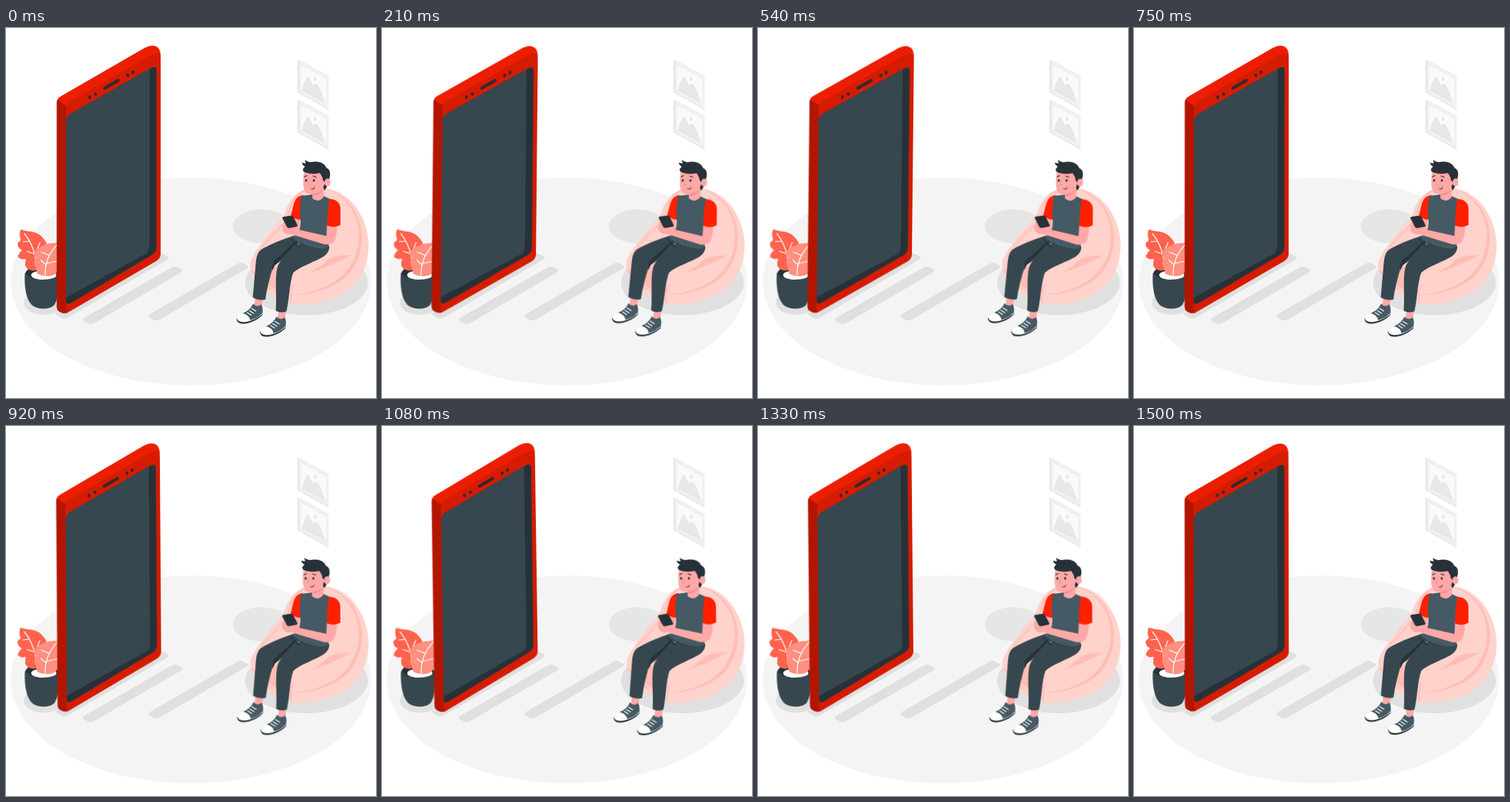
Animation of 500x500 px, one loop 1.54 s. Source, as an HTML page without scripts:

```html
<!DOCTYPE html>
<html lang="en">
<head>
<meta charset="utf-8">
<title>Phone and reader</title>
<style>
  html, body { margin: 0; width: 100%; height: 100%; overflow: hidden; background: #fff; }
  svg { display: block; width: 100vw; height: 100vh; }
  .sway { animation: sway 1.54s linear infinite; }
  .plant { transform-origin: 48px 325px; }
  .phone { transform-origin: 139px 205px; }
  .reader { transform-origin: 401px 298px; }
  @keyframes sway {
    25% { transform: rotate(1deg); }
    75% { transform: rotate(-1deg); }
  }
  .line { fill: none; stroke-linecap: round; stroke-linejoin: round; }
  .dark { fill: #263238; }
  .slate { fill: #37474f; }
  .skin { fill: #ffa8a7; }
  .red { fill: #ff2000; }
</style>
</head>
<body>
<svg viewBox="0 0 500 500">
  <defs>
    <g id="picture">
      <path fill="#e6e6e6" d="M394 44l2-1 40 22v44l-1 1-41-23z"/>
      <path fill="#f0f0f0" d="M396 43l40 22v44l-40-22z"/>
      <path fill="#fafafa" d="M398.500 50l34 18.500v35l-34-18.500z"/>
      <path fill="#e8e8e8" d="M399 84.500c3-6 5-15 8-19 3 1 5 8 8 12 2-2 4-3 6-1 4 5 8 16 11 26z"/>
      <ellipse fill="#e8e8e8" cx="418" cy="68.500" rx="2" ry="2.700"/>
    </g>
    <path id="bar" d="M105 392L224 323.500q4-2 8-.5l5 3q3 2 0 4L119 399q-4 2-8 .5l-6-3.500q-2-2 0-4z"/>
    <g id="shoe">
      <path class="skin" d="M337 364l10 2-2 12q-5 3-10-1z"/>
      <path class="dark" d="M311.500 393q2-4 12-6l23-6v7q-8 8-20 11-14 3-15-6z"/>
      <path fill="#fff" d="M312 392q3-5 12-7l7 5 15-7v4q-8 7-20 10-13 2-14-5z"/>
      <path fill="#455a64" d="M334 372.500q5 6 11 1 3 5 1 12-6 7-16 9.500-1-7-10-9.500 10-4 14-13z"/>
      <path class="line" stroke="#fff" stroke-width="1.200" d="M332 379l5.500 3.500M329 382l5.500 3.500M326 384.500l5.500 3.500"/>
    </g>
  </defs>

  <ellipse fill="#f4f4f4" cx="250" cy="342.500" rx="243.500" ry="140.500"/>
  <g fill="#e0e0e0">
    <ellipse fill="#e6e6e6" cx="345" cy="268" rx="38.500" ry="23"/>
    <ellipse cx="406" cy="344" rx="83" ry="44"/>
    <ellipse cx="51" cy="371" rx="27" ry="16.500"/>
    <path d="M66 386L207 303l11 5q3 2 0 5L84 391q-5 3-9 1z"/>
    <use href="#bar"/>
    <use href="#bar" x="88.500" y="-5"/>
  </g>
  <use href="#picture"/>
  <use href="#picture" y="54"/>

  <g class="sway plant">
    <path class="dark" d="M26 332C27 325 38 322 50 323c12 1 21 5 21 10l-4 9H32z"/>
    <ellipse fill="#fff" cx="51" cy="334" rx="17" ry="6.500"/>
    <path class="slate" d="M25.500 331c5 7 15 9 24 9 11 0 20-3 22-7 1 17 0 31-6 41-6 7-23 7-31 0-8-9-10-26-9-43z"/>
    <path fill="#ff634d" d="M20 272c6 3 12 2 18 4 7 2 10 5 13 9 4 4 5 9 4 14l-9 22c-2 4-4 6-8 7-5 0-10-2-12-7 0-3 0-6 1-9-5 1-9 0-11-3 1-4 3-6 6-9-4-1-7-5-6-10 2-1 3-2 4-4-2-5-2-9 0-14z"/>
    <path class="line" stroke="#fff" stroke-width="1.200" d="M25 278q15 18 17 49M32 288l-9 1M40 306l-11-4M40 304l6-14"/>
    <path fill="#ff8f80" d="M71 290c-8 1-14 0-21 4-8 3-13 7-12 14l3 3c-3 4-4 8-1 12l2 3c-2 5 1 7 5 8 8 2 15 2 20-2l4-6z"/>
    <path class="line" stroke="#fff" stroke-width="1.200" d="M70 292q-18 18-17 42M58 307l-10-4M54 320l-7-6M55 318l14-3"/>
  </g>

  <g class="sway phone">
    <path fill="#b31600" d="M68.500 101q0-5 5-8l15 7-4 284q-4 2.500-9 1l-4-2q-3-2-3-7z"/>
    <path fill="#ec1e02" d="M69.500 97q1-3 5-5L188 26.500q10-5 16-1 5 3 5 13l-20 5L84 106q-9-4-14.500-9z"/>
    <path fill="#d51c03" d="M81 109q0-6 6-10L194 37.500q10-5 13-2.500 2 1 2 7v263q0 6-6 10L87 382.500q-6 3.500-6-3z"/>
    <path class="dark" d="M81 127q0-7 6-11L196 54q7.500-4 7.500 4v238q0 7-6 10.500L88 371.500q-7 4-7-3z"/>
    <path class="slate" d="M81 127q0-7 6-11L194 55v240q0 7-6 10.500L81 364.500z"/>
    <path class="line" stroke="#35282a" stroke-width="4.300" d="M133.500 81.300l18-10.300"/>
    <g fill="#35282a">
      <ellipse cx="113" cy="93.700" rx="2" ry="2.400"/>
      <ellipse cx="121" cy="89.300" rx="2" ry="2.400"/>
      <ellipse cx="164.500" cy="64" rx="2" ry="2.400"/>
      <ellipse cx="171.500" cy="60" rx="2" ry="2.400"/>
    </g>
  </g>

  <g class="sway reader">
    <path fill="#ffd2cc" d="M330 321c0-13 14-27 24-42 7-10 17-17 22-28 6-18 17-33 37-35 19-1 36 2 51 16 17 16 26 40 26 62 0 23-8 43-23 56-17 15-44 24-69 24-22 0-39-10-52-24-9-9-16-19-16-29z"/>
    <path fill="#ffbdb4" d="M434 217c26 9 41 29 46 54 4 26-5 47-18 63-20 18-46 26-76 27 34-4 55-13 71-29 14-15 20-32 20-53-1-25-13-47-43-62z"/>
    <path fill="#ffbdb4" d="M466 307c-12-1-22 1-31 6-7 7-17 14-27 19 18-6 37-14 58-25z"/>
    <path class="line" stroke="#ffbdb4" stroke-width="1.500" d="M404 219q-18 9-22 33M382 252q-6 14-36 43M332 327q9 14 28 28M388 347q-4 10-3 25"/>
    <path fill="#ffbdb4" d="M361 322l7 2-2 30q-7-2-12-8z"/>

    <use href="#shoe"/>
    <use href="#shoe" x="31.500" y="17.500"/>
    <path class="slate" d="M392 280c-18 5-37 13-48 20-6 5-6 14-7 24l-3.500 40q8 5 17 3c2-15 6-30 10.500-45l36-24z"/>
    <path class="dark" d="M398 284c-13 8-22 20-34 29-4 4-4 9-4 15 3-8 7-13 14-18z"/>
    <path class="slate" d="M386 281q24 4 51 14c0 11-9 15-20 20-10 5-22 9-29 16-5 14-5 35-9 52q-8 3-14.500-1c2-20-2-47 3-61 5-10 19-18 29-29z"/>
    <path class="line" stroke="#263238" stroke-width="1.100" d="M386 284q3 10 11 12M398 291q16 8 37 5"/>

    <path class="skin" d="M386 252l11 4-1 16-12 7q-8 0-10-7l3-12z"/>
    <path class="red" d="M402 226c-9 0-12 7-14 15l-3 12q5 6 14 6z"/>
    <path fill="#455a64" d="M399 227l15-2q5 9 15 2l9 4q-3 19-3 35l1 29q-4 4-13 3-23-3-36-15 11-6 11-20l-1-17z"/>
    <path class="skin" d="M414 221v9q7 7 15-1l2-17z"/>
    <path fill="#f28f8f" d="M415 224q9-1 13-6-3 8-13 9z"/>

    <path class="skin" d="M434 264l13 2q1 14-4 23-5 5-14 3l-36-11-10-3q-6 1-9-4-2-6 2-11l9 4q6 1 8 5l40 9z"/>
    <path class="red" d="M437 231c9 0 14 5 15 12v23q-8 5-18 1 0-20 3-36z"/>
    <path class="dark" d="M373.500 257q0-2 2-2l10-1.500q2 0 3 2l5 10q1 3-1 3l-10 2q-2 0-3-2z"/>

    <path class="skin" d="M403 193c-2 11-2 21 1 28 3 4 9 4 14 2 6-2 11-5 14-10l1-18-12-6z"/>
    <path class="dark" d="M401 191l3-4q-4-2-4-5l5 1-1-5q4 4 9 3c8-2 18 1 20 8q5 2 5 8 0 6-3 10l-2-2-2 4-3-4c0-4-2-6-4-9-8 2-17 1-22-2z"/>
    <path class="dark" d="M430 211l4 3-3 5q-2-1-2-4z"/>
    <ellipse class="skin" cx="434.500" cy="208.500" rx="4" ry="5.200"/>
    <g class="dark">
      <ellipse cx="405.500" cy="206" rx="1.400" ry="1.800"/>
      <ellipse cx="416" cy="206" rx="1.400" ry="1.800"/>
    </g>
    <path class="line" stroke="#263238" stroke-width="1.200" d="M403.500 201l3-1.500M415 200l4 1.500"/>
    <path class="line" stroke="#f28f8f" stroke-width="1" d="M409.500 207l-2 4.500h3"/>
    <path fill="#8c2a24" d="M411 216q4 0 6.500-1.800-.5 4-3.500 4-2 0-3-2.200z"/>
    <path fill="#fff" d="M411.500 216q3.500 0 5.500-1.300-1 2.300-4.500 2.300z"/>
  </g>
</svg>
</body>
</html>
```
